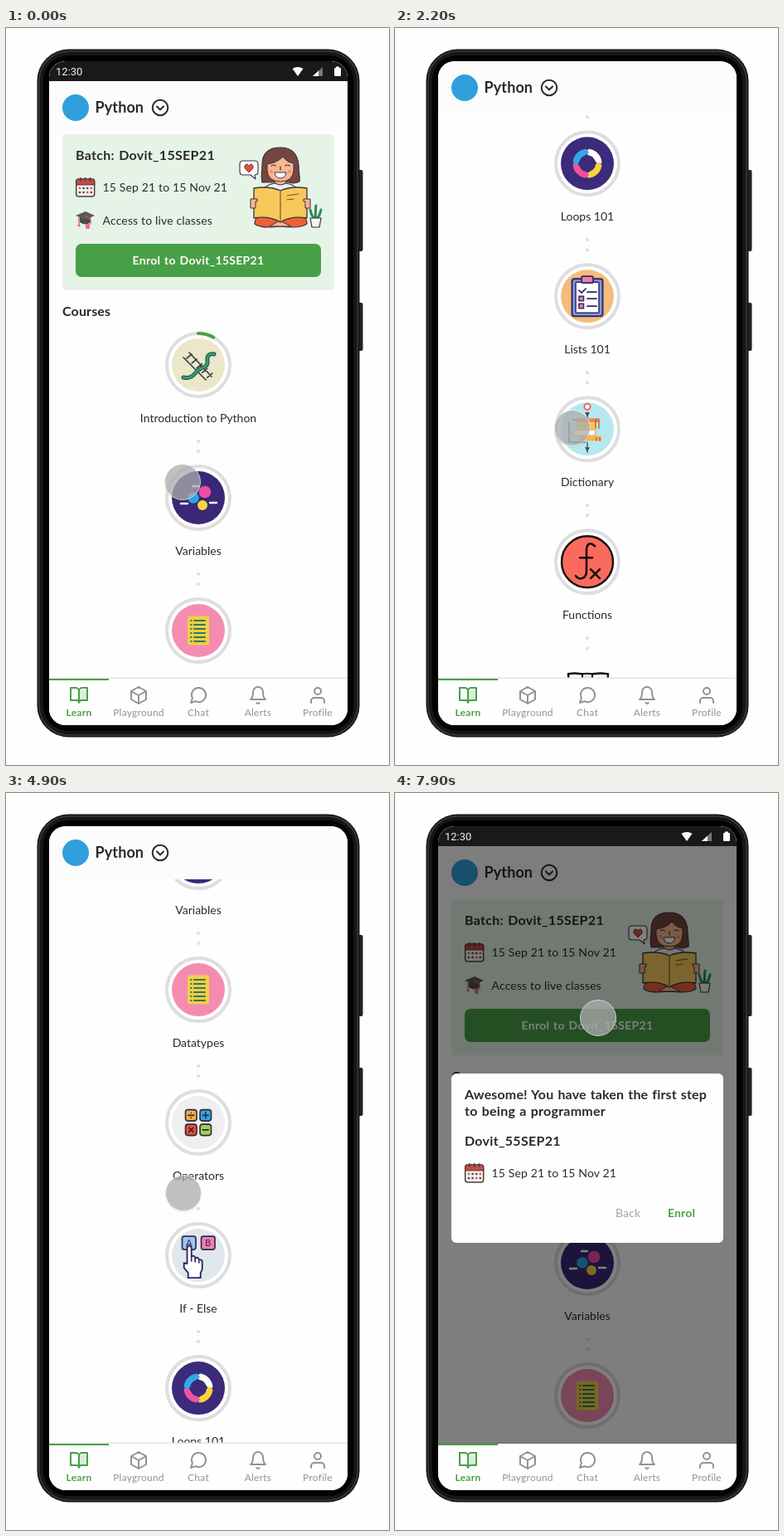
These frames come from a looping animation (462 by 888 pixels, 8000 ms). An HTML page:

```html
<!DOCTYPE html>
<html lang="en">
<head>
<meta charset="utf-8">
<title>Learning app</title>
<style>
html, body { margin: 0; width: 100%; height: 100%; overflow: hidden; background: #fefefe; }
svg { display: block; width: 462px; height: 888px; }
text { font-family: Lato, "Open Sans", sans-serif; fill: #252525; }
.bold { font-weight: 700; word-spacing: 1px; }
.line { fill: none; stroke-linecap: round; stroke-linejoin: round; }
</style>
</head>
<body>
<svg id="stage" viewBox="0 0 462 888" xmlns="http://www.w3.org/2000/svg"></svg>
<script>
const GREEN = '#48a046', INK = '#2a2a2a', NAVY = '#30295f';
const LOOP = 8000, STEP = 100;

const rect = (x, y, w, h, fill, r = 0, more = '') =>
  `<rect x="${x}" y="${y}" width="${w}" height="${h}" rx="${r}" fill="${fill}" ${more}/>`;
const disc = (x, y, r, fill, more = '') =>
  `<circle cx="${x}" cy="${y}" r="${r}" fill="${fill}" ${more}/>`;
const line = (d, color, width = 2, more = '') =>
  `<path class="line" d="${d}" stroke="${color}" stroke-width="${width}" ${more}/>`;
const shape = (d, fill, stroke = 'none', width = 1) =>
  `<path d="${d}" fill="${fill}" stroke="${stroke}" stroke-width="${width}" stroke-linejoin="round"/>`;
const text = (x, y, size, str, { bold, color = INK, anchor = 'start', space = 0.15 } = {}) =>
  `<text x="${x}" y="${y}" font-size="${size}" ${bold ? 'class="bold"' : ''} text-anchor="${anchor}"
    style="fill:${color};letter-spacing:${space}px">${str}</text>`;
const at = (x, y, body) => `<g transform="translate(${x} ${y})">${body}</g>`;
const range = n => [...Array(n).keys()];

// ---- course icons, drawn around (0, 0) ----
const ring = disc(0, 0, 38, '#fff', 'stroke="#dedee0" stroke-width="4"');

function introIcon() {
  const rungs = range(5).map(i => `M${-14 + i * 6.2} ${-8 + i * 5.8}l6-5`).join('');
  const snake = 'M-18 15C-10 17-6 13-2 8C2 2 12 5 11-5C10-12 14-14 19-13';
  return disc(0, 0, 32, '#ece6ca') +
    line('M-11-15L16 14M-18-9L9 18' + rungs, '#3b4248', 1.7) +
    line(snake, '#1f5d54', 5) + line(snake, '#3f9a71', 2.6);
}

function variablesIcon() {
  return disc(0, 0, 32, '#3a2876') +
    line('M-7-14h7M-21 7h8M14 6h8', '#fff', 2.4) +
    disc(8, -7, 7.3, '#ee4fa0') + disc(-6, 0, 6.8, '#2aa5e6') + disc(5, 9, 6, '#fbd33e');
}

function datatypesIcon() {
  const rows = range(6).map(i => `M-9 ${-12 + i * 5}h.6M-5 ${-12 + i * 5}h13`).join('');
  return disc(0, 0, 32, '#f48cb2') +
    rect(-13, -17.5, 26, 35, '#f3cf45', 3) + line(rows, '#2f7a5c', 2);
}

function operatorsIcon() {
  const key = (x, y, color, sign) =>
    rect(x, y, 13.5, 13.5, color, 3, 'stroke="#2b2b33" stroke-width="1.6"') +
    at(x + 6.75, y + 6.75, line(sign, '#2b2b33', 1.6));
  return disc(0, 0, 32, '#efefef') +
    key(-15.5, -15.5, '#eeb04a', 'M-3.5 0h7M0-3v.1M0 3v.1') +
    key(2, -15.5, '#36a2e8', 'M-3.5 0h7M0-3.5v7') +
    key(-15.5, 2, '#ee4b3a', 'M-2.5-2.5l5 5M2.5-2.5l-5 5') +
    key(2, 2, '#a4cf5b', 'M-3.5 0h7');
}

function ifElseIcon() {
  const key = (x, color, letter) =>
    rect(x, -23, 16.5, 16, color, 2.5, `stroke="${NAVY}" stroke-width="1.7"`) +
    text(x + 8.25, -11, 11, letter, { color: NAVY, anchor: 'middle' });
  return disc(0, 0, 32, '#e0e8ec') + key(-19.5, '#9cc6ea', 'A') + key(3.5, '#f07fa6', 'B') +
    shape('M-13.5 10V-9a2.6 2.6 0 0 1 5.2 0V1c3-1 4 0 4.5 2c3-1 4 0 4.5 2c3 0 4 1 4 3v9l-2 4v6h-15v-6l-5-6v-6z',
      '#fff', NAVY, 1.9) +
    line('M-8.3 1v6M-3.8 3v5M.7 5v4', NAVY, 1.6);
}

function loopsIcon() {
  const colors = ['#fff', '#fbd33e', '#f0529f', '#35a8e8'];
  return disc(0, 0, 32, '#3c2a7a') + colors.map((color, i) =>
    `<g transform="rotate(${i * 90})">${
      shape('M2-17.5A17.5 17.5 0 0 1 17.5-1L13 2L9-4A10 10 0 0 0 1-10L-2-14Z', color)}</g>`).join('');
}

function listsIcon() {
  return disc(0, 0, 32, '#f5bc7c') +
    rect(-18.5, -21, 37, 45, '#7f9be4', 3, `stroke="${NAVY}" stroke-width="2"`) +
    rect(-14, -17, 28, 37, '#fff', 1, `stroke="${NAVY}" stroke-width="1.5"`) +
    rect(-7, -24, 14, 8, '#ef7fa8', 2, `stroke="${NAVY}" stroke-width="1.7"`) +
    line('M-10-7l3 3 5-5M0-5h11M0 3h11M0 12h11', NAVY, 1.8) +
    [0, 9].map(y => rect(-10, y, 5.5, 5.5, '#ef7fa8', 0, `stroke="${NAVY}" stroke-width="1.5"`)).join('');
}

function dictionaryIcon() {
  return disc(0, 0, 32, '#b5e8ef') +
    line('M0-20v9M-18-11h16M-22-8V16H-3M0 16v12', '#3c4a58', 1.3) +
    disc(0, -27, 3.6, '#fff', 'stroke="#ef5a4c" stroke-width="1.8"') +
    shape('M-3-20h6l-3 5zM-3 22h6l-3 5z', '#3c4a58') +
    rect(-13, -13, 27, 5, '#f08a4a', 1) + rect(-12, -7, 22, 7, '#f6c645', 1) +
    rect(-17, 1, 27, 7, '#fff', 2, 'stroke="#ef9c45" stroke-width="1.3"') +
    rect(-10, 9, 27, 5, '#f6b43f', 1) + line('M10-12v11M14-12v11M11 10v4M15 10v4', '#d9582f', 1.4);
}

function functionsIcon() {
  return disc(0, 0, 31, '#fb6b5d', 'stroke="#15100f" stroke-width="2.4"') +
    line('M9-19C3-25-1-21-1-14V11C-1 20-9 23-14 17M-9-5H6', '#15100f', 2.6) +
    line('M4 9L15 20M15 9L4 20', '#15100f', 2.5);
}

function bookIcon() {
  return shape('M-23-25Q-10-27 0-23Q10-27 25-25L22 22Q10 19 0 23Q-10 19-20 22Z', '#fff', '#111', 2.4) +
    shape('M-6-25Q0-26 6-25V-4L0-9L-6-4Z', '#e8e8e8', '#111', 2) + line('M0-8V22', '#111', 2);
}

const courses = [
  ['Introduction to Python', introIcon], ['Variables', variablesIcon], ['Datatypes', datatypesIcon],
  ['Operators', operatorsIcon], ['If - Else', ifElseIcon], ['Loops 101', loopsIcon],
  ['Lists 101', listsIcon], ['Dictionary', dictionaryIcon], ['Functions', functionsIcon],
];

function courseList() {
  const items = courses.map(([name, icon], i) => at(232, 406 + i * 160,
    ring + icon() + text(0, 69, 14, name, { anchor: 'middle', space: 0 }) +
    disc(0, 92, 2, '#dedede') + disc(0, 104, 2, '#dedede')));
  const a = 0.08 * 2 * Math.PI;
  const progress = line(`M0-38A38 38 0 0 1 ${38 * Math.sin(a)} ${-38 * Math.cos(a)}`, GREEN, 4);
  return items.join('') + at(232, 406, progress) + at(232, 406 + courses.length * 160, bookIcon());
}

// ---- batch card ----
function calendar(x, y) {
  const days = range(8).map(i => disc(5 + (i % 4) * 4.6, 13 + (i >> 2) * 5, 1.3, i % 3 ? '#4a4242' : '#e2493d')).join('');
  return at(x, y, rect(.7, 2, 22, 21, '#f6f1ee', 3, 'stroke="#4a4040" stroke-width="1.5"') +
    shape('M.7 9V5Q.7 2 4 2H19.5Q22.7 2 22.7 5V9Z', '#d2463f', '#4a4040', 1.2) +
    line('M6 .8V4M11.7 .8V4M17.4 .8V4', '#4a4040', 1.7) + days);
}

function gradCap(x, y) {
  return at(x, y, shape('M5 7h13v6q-6 5-13 0z', '#4a4a4a') + shape('M0 5L12 0L23 5L12 10Z', '#5a5a5a') +
    line('M4 7v9M12 5l6 5v5', '#c9584f', 1.2) + disc(4, 17, 1.6, '#e06a5c') +
    shape('M12 15h5v6h-5z', '#ee6fa0'));
}

function reader() {
  const dark = '#3a3140', skin = '#f9b78f';
  return shape('M309 186C307 178 309 174 309 165C309 149 318 144 331 144C345 144 352 151 353 166C353 176 355 180 354 185Q347 188 342 186H318Z',
      '#74463f', dark, 1.2) +
    rect(325, 178, 12, 14, skin) +
    shape('M306 200Q312 188 325 187Q331 191 337 187Q350 188 356 200V230H306Z', '#e9eef6', dark, 1.2) +
    shape('M315 164Q328 162 334 155Q339 162 347 163V171Q346 185 331 185Q316 185 315 171Z', skin, dark, 1) +
    line('M320 166q3-2 5 0M337 166q3-2 5 0M331 167v4', dark, 1.2) +
    shape('M324 174H338Q337 181 331 181Q325 181 324 174Z', '#fff', dark, 1) +
    disc(320, 173, 2, '#f48a7c') + disc(342, 173, 2, '#f48a7c') +
    shape('M300 236Q300 224 318 222L331 230L345 222Q363 224 363 236Q355 242 331 239Q307 242 300 236Z', '#ee6038', dark, 1.2) +
    shape('M318 239L330 232L344 239Z', skin, dark, 1) +
    shape('M299 193Q318 190 331 196Q344 190 363 193V229Q344 226 331 234Q318 226 299 229Z', '#f7c95a', dark, 1.3) +
    line('M331 196V234M339 202l14-2M339 207l8-1', '#6f5426', 1.1) +
    shape('M295 206h8v3h-2v8h-6z', skin, dark, 1) + shape('M367 206h-8v3h2v8h6z', skin, dark, 1) +
    shape('M286 160H300Q304 160 304 164V173Q304 177 300 177H300L301 182L295 177H286Q282 177 282 173V164Q282 160 286 160Z', '#fff', dark, 1.1) +
    shape('M293 174L288 169Q287 164 291 164L293 166L295 164Q299 164 298 169Z', '#e84d3d', dark, .8) +
    line('M373 229C374 221 373 218 374 214M373 230C368 227 368 222 367 219M374 230C379 227 379 222 380 219', '#2f8b54', 3) +
    shape('M367 229H380L378 240H369Z', '#f4f4f4', dark, 1.2);
}

const batchCard = () =>
  rect(68, 128, 328, 188, '#e6f3e7', 4) +
  text(84, 159, 16, 'Batch: Dovit_15SEP21', { bold: true, space: 0.3 }) +
  calendar(84, 180) + text(116.5, 197, 14, '15 Sep 21 to 15 Nov 21') +
  gradCap(84, 221) + text(116.5, 237, 14, 'Access to live classes') +
  reader() + rect(84, 260, 296, 40, GREEN, 7) +
  text(232, 285, 14, 'Enrol to Dovit_15SEP21', { bold: true, color: '#fff', anchor: 'middle', space: 0.3 }) +
  text(68, 347, 16, 'Courses', { bold: true });

// ---- fixed parts ----
const header = () =>
  rect(52, 16, 360, 112, '#fcfcfc') + rect(50, 38, 364, 26, '#191919') +
  `<text x="60" y="57" font-size="13" style="font-family:Roboto,sans-serif;fill:#f2f2f2">12:30</text>` +
  shape('M345.5 49Q352 45 358.5 49L352 58Z', '#fff') +
  shape('M370 58L382 47V58Z', '#777') + shape('M370 58L377 51.5V58Z', '#fff') +
  rect(396, 48, 8, 10, '#fff', 1) + rect(398, 46.5, 4, 2, '#fff') +
  disc(84, 96, 16, '#2f9fdc') + text(107.5, 102, 18, 'Python', { bold: true, space: 0.1 }) +
  disc(186, 96, 9.3, 'none', `stroke="${INK}" stroke-width="2"`) + line('M182 94.5l4 4 4-4', INK, 2);

const tabs = [
  ['Learn', 'M2 3h6a4 4 0 0 1 4 4v14a3 3 0 0 0-3-3H2zM22 3h-6a4 4 0 0 0-4 4v14a3 3 0 0 1 3-3h7z'],
  ['Playground', 'M21 7v10l-9 5L3 17V7l9-5zM3 7l9 5 9-5M12 22V12'],
  ['Chat', 'M21 11.5a8.4 8.4 0 0 1-12.3 7.6L3 21l1.9-5.7A8.4 8.4 0 0 1 12.5 3h.5a8.5 8.5 0 0 1 8 8z'],
  ['Alerts', 'M18 8A6 6 0 0 0 6 8c0 7-3 9-3 9h18s-3-2-3-9M13.7 21a2 2 0 0 1-3.4 0'],
  ['Profile', 'M20 21v-2a4 4 0 0 0-4-4H8a4 4 0 0 0-4 4v2M16 7a4 4 0 1 1-8 0a4 4 0 0 1 8 0'],
];

const tabBar = () =>
  rect(52, 784, 360, 60, '#fefefe') + rect(52, 784, 72, 2, GREEN) + rect(89, 798, 8, 12, '#d9eeda') +
  tabs.map(([name, d], i) => {
    const color = i ? '#929292' : GREEN, x = 88 + i * 72;
    return at(x - 12, 792, line(d, color, 2)) +
      text(x, 829, 12, name, { bold: !i, color, anchor: 'middle', space: 0.25 });
  }).join('');

const dialog = () =>
  rect(68, 338, 328, 204, '#fefefe', 6) +
  text(84, 369, 16, 'Awesome! You have taken the first step', { bold: true }) +
  text(84, 389, 16, 'to being a programmer', { bold: true, space: 0.25 }) +
  text(84, 425, 16, 'Dovit_55SEP21', { bold: true, space: 0.3 }) +
  calendar(84, 446) + text(116.5, 463, 14, '15 Sep 21 to 15 Nov 21') +
  text(266, 511, 14, 'Back', { color: '#a3a3a3' }) +
  text(329, 511, 14, 'Enrol', { bold: true, color: GREEN });

const phone = () =>
  rect(424, 171, 6.5, 98, '#222', 2) + rect(424, 331, 6.5, 58, '#222', 2) +
  rect(37.5, 25.5, 389, 829, '#161616', 38) +
  rect(40, 28, 384, 824, 'none', 35.5, 'stroke="#3a3a3a" stroke-width="1.5"') +
  rect(45, 33, 374, 814, '#020202', 30);

const stage = document.getElementById('stage');
stage.innerHTML = `
  <defs><clipPath id="screen"><rect x="52" y="40" width="360" height="800" rx="20"/></clipPath></defs>
  ${phone()}
  <g clip-path="url(#screen)">
    ${rect(52, 40, 360, 800, '#fefefe')}
    <g id="content">${batchCard()}${courseList()}</g>
    <g id="header">${header()}</g>
    ${rect(52, 782.5, 360, 1.5, '#e6e6e6')}
    <rect id="dim" x="52" y="64" width="360" height="720"/>
    ${tabBar()}
    <g id="dialog">${dialog()}</g>
  </g>
  <g id="touch">
    ${disc(0, 1, 22.5, '#000', 'opacity=".06"')}
    ${disc(0, 0, 21.5, '#b0b0b0', 'fill-opacity=".74" stroke="#fff" stroke-opacity=".65"')}
  </g>`;
const [content, head, dim, popup, touch] =
  ['content', 'header', 'dim', 'dialog', 'touch'].map(id => document.getElementById(id));

// ---- motion ----
const smooth = p => p * p * (3 - 2 * p);
const easeOut = p => 1 - (1 - p) ** 2;
const linear = p => p;

// Each move: start, end, target value, easing.
function track(t, value, moves) {
  for (const [start, end, target, ease] of moves) {
    if (t <= start) break;
    value += (target - value) * ease(Math.min(1, (t - start) / (end - start)));
  }
  return value;
}

const scrollMoves = [
  [400, 1650, 433, smooth], [1700, 2450, 1119, easeOut],
  [3300, 4500, 704, easeOut], [4800, 5400, 0, easeOut],
];
const touchX = [[0, 300, 214, smooth], [5900, 6800, 245, smooth]];
const touchY = [[0, 300, 482, smooth], [5900, 6800, 271, smooth]];
const fade = [[7100, 7600, 1, linear]];

const move = (el, x, y) => el.setAttribute('transform', `translate(${x} ${y})`);

function draw(t) {
  const scroll = track(t, 0, scrollMoves), shown = track(t, 0, fade);
  move(content, 0, -scroll);
  move(head, 0, -Math.min(24, scroll));
  move(touch, track(t, 213, touchX), track(t, 547, touchY));
  dim.setAttribute('opacity', 0.5 * shown);
  popup.setAttribute('opacity', shown);
}

function tick() {
  const t = performance.now() % LOOP;
  draw(Math.floor(t / STEP) * STEP);
  requestAnimationFrame(tick);
}
tick();
</script>
</body>
</html>
```
